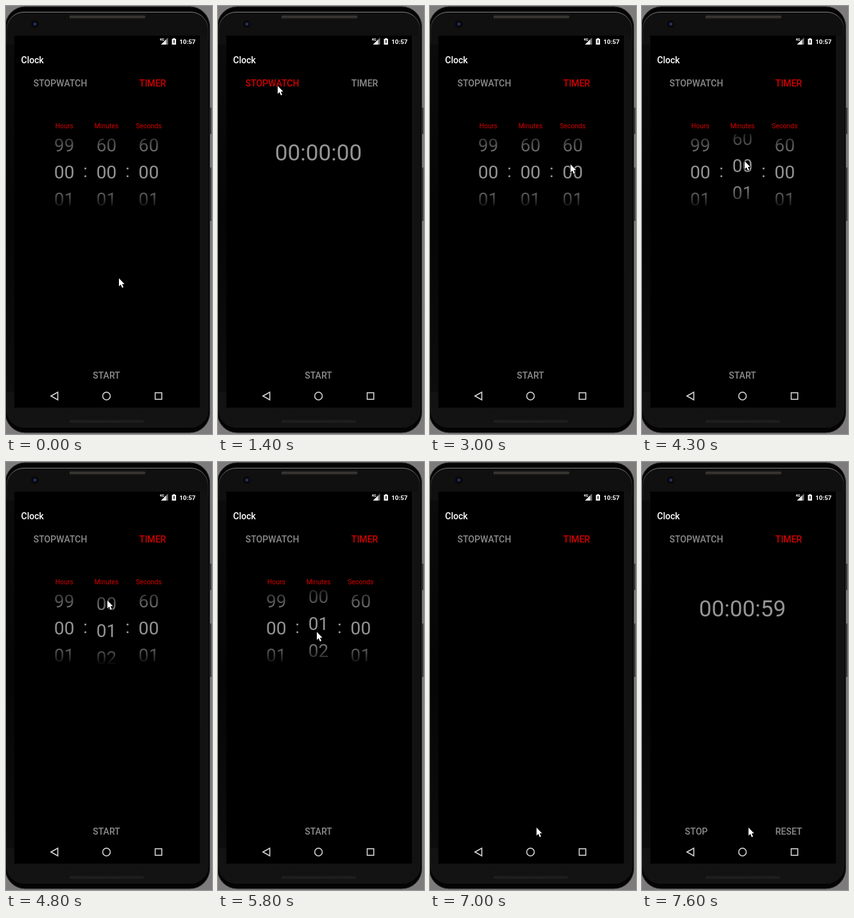
An HTML page with a canvas for the animation above (8000 ms loop, 321x665 px).

```html
<!DOCTYPE html>
<html lang="en">
<head>
<meta charset="utf-8">
<title>Clock</title>
<style>
  html, body { margin: 0; width: 100%; height: 100%; overflow: hidden; background: #7d7b7b; }
  canvas { display: block; width: 321px; height: 665px; }
</style>
</head>
<body>
<canvas id="stage"></canvas>
<script>
const W = 321, H = 665, LOOP = 8000, STEP = 100;
const DP = 0.7027;            // stage pixels per device unit
const CX = 156.6, ROW = 42;   // screen centre, wheel row height
const GREY = '#8b8b8b', DIGIT = '#949494', RED = '#d40000';

const canvas = document.getElementById('stage');
const ctx = canvas.getContext('2d');
const dpr = window.devicePixelRatio || 1;
canvas.width = W * dpr;
canvas.height = H * dpr;
ctx.scale(dpr, dpr);

const linear = k => k;
const smooth = k => k * k * (3 - 2 * k);
const easeOut = k => k * (2 - k);
const progress = (t, from, to, ease = smooth) =>
  ease(Math.min(1, Math.max(0, (t - from) / (to - from))));

// The pointer glides from place to place, on a curve if "via" is given.
function pointerAt(t) {
  let pos = [176, 423];
  const glide = (from, to, end, ease, via) => {
    const k = progress(t, from, to, ease);
    pos = pos.map((a, i) => {
      const b = end[i];
      if (!via) return a + (b - a) * k;
      return (1 - k) ** 2 * a + 2 * k * (1 - k) * via[i] + k * k * b;
    });
  };
  glide(400, 1200, [93, 124]);
  glide(1500, 2100, [217, 126]);
  glide(2700, 3600, [162, 274], linear, [235, 359]);
  glide(4000, 4900, [158, 214], easeOut);
  glide(5100, 5400, [153, 222]);
  glide(5600, 6500, [162, 555]);
  glide(6500, 6800, [166, 568], easeOut);
  return pos.map(Math.round);
}

// Two drags, then the wheel snaps back to a whole row.
function scrollAt(t) {
  const drag = 39 * progress(t, 4000, 4900) + 10 * progress(t, 5100, 5400);
  return drag + (ROW - 49) * progress(t, 5800, 6100);
}

function text(str, x, y, dp, color, align = 'center', weight = 400) {
  ctx.font = `${weight} ${dp * DP}px Roboto, sans-serif`;
  ctx.textAlign = align;
  ctx.fillStyle = color;
  ctx.fillText(str, x, y);
}

function rect(x, y, w, h, color) {
  ctx.fillStyle = color;
  ctx.fillRect(x, y, w, h);
}

function rounded(x, y, w, h, r, fill, stroke) {
  ctx.beginPath();
  ctx.roundRect(x, y, w, h, r);
  ctx.fillStyle = fill;
  ctx.fill();
  if (!stroke) return;
  ctx.lineWidth = 1;
  ctx.strokeStyle = stroke;
  ctx.stroke();
}

function disc(x, y, r, color) {
  ctx.beginPath();
  ctx.arc(x, y, r, 0, Math.PI * 2);
  ctx.fillStyle = color;
  ctx.fill();
}

function poly(points, fill) {
  ctx.beginPath();
  points.forEach(p => ctx.lineTo(...p));
  ctx.closePath();
  if (!fill) return;
  ctx.fillStyle = fill;
  ctx.fill();
}

function fade(x0, y0, x1, y1, ...colors) {
  const g = ctx.createLinearGradient(x0, y0, x1, y1);
  colors.forEach((c, i) => g.addColorStop(i / (colors.length - 1), c));
  return g;
}

function drawPhone() {
  rect(0, 0, W, H, '#7d7b7b');
  rect(318, 158, 2, 41, '#383838');
  rect(318, 251, 2, 83, '#383838');
  rounded(-1, 1, 318.5, 662, 31, '#040404', '#303030');
  rounded(1, 9.5, 314, 645, 27,
    fade(0, 9, 0, 655, '#101010', '#0e0e0e', '#131313'),
    fade(0, 9, 0, 60, '#858585', '#252525', '#171717'));
  rect(0, 60, 13, 540, fade(0, 60, 0, 600, '#0b0b0b', '#050505', '#0d0d0d'));
  rect(302, 46, 12, 578, '#121212');

  rounded(99, 14, 118, 6, 2, fade(0, 14, 0, 20, '#1a1a1a', '#413d39', '#141414'));
  disc(45, 28, 6, '#08080a');
  disc(45, 28, 3, '#131a38');
  disc(45, 28, 1.5, '#33427c');
  rect(99, 643, 116, 5, '#191919');
  for (let x = 100; x < 214; x += 3) {
    rect(x, 644, 1, 1, '#333');
    rect(x + 1, 646, 1, 1, '#333');
  }
  rect(13, 46, 289, 578, '#000');
}

function drawSignal(x, y) {
  const corner = (size, right, color) =>
    poly([[right - size, y], [right, y], [right, y - size]], color);
  corner(11, x + 11, '#777');
  corner(8, x + 8, '#e8e8e8');
}

function drawSystemBars() {
  text('4G', 243, 53.5, 8, '#fff', 'center', 700);
  drawSignal(241.5, 60);
  rect(258.5, 51, 6.5, 9, '#eee');
  rect(260.3, 50, 3, 1, '#eee');
  rect(261, 53, 1.6, 4.5, '#222');
  text('10:57', 295.5, 59, 14, '#fff', 'right', 700);

  ctx.strokeStyle = '#dedede';
  ctx.lineWidth = 1.5;
  poly([[70, 606], [80.7, 600], [80.7, 612]]);
  ctx.stroke();
  ctx.beginPath();
  ctx.arc(CX, 606, 5.9, 0, Math.PI * 2);
  ctx.stroke();
  ctx.strokeRect(232.5, 600.9, 10.2, 10.2);
}

function drawWheel(x, last, scroll) {
  ctx.save();
  ctx.beginPath();
  ctx.rect(x - 16, 199, 32, 116);
  ctx.clip();
  for (let i = 0; i < 5; i++) {
    const n = i ? '0' + (i - 1) : last;
    text(n, x, 226 + i * ROW - scroll, 40, DIGIT);
  }
  rect(x - 16, 186, 32, 54, fade(0, 186, 0, 240, '#000', '#0000'));
  rect(x - 16, 276, 32, 40, fade(0, 276, 0, 316, '#0000', '#000'));
  ctx.restore();
}

function drawPicker(scroll) {
  ['Hours', 'Minutes', 'Seconds'].forEach((name, i) => {
    const x = CX + (i - 1) * 65.8;
    text(name, x, 189.5, 15, RED);
    drawWheel(x, i ? 60 : 99, i === 1 ? scroll : 0);
    if (i) text(':', x - 33, 266, 40, DIGIT);
  });
}

function drawPointer(x, y) {
  ctx.save();
  ctx.translate(x, y);
  poly([[0, 0], [0, 12.5], [2.9, 9.8], [4.9, 14.8], [7, 13.9], [5, 9.1], [8.6, 9.1]]);
  ctx.lineJoin = 'round';
  ctx.lineWidth = 1.6;
  ctx.strokeStyle = '#000';
  ctx.stroke();
  ctx.fillStyle = '#fff';
  ctx.fill();
  ctx.restore();
}

function draw(t) {
  const stopwatch = t >= 1400 && t < 2400;
  const pressed = t >= 7000, running = t >= 7400;
  const label = (s, x, y, color = GREY) => text(s, x, y, 20, color, 'center', 500);
  const readout = s => text(s, CX, 240, 50, DIGIT);

  drawPhone();
  drawSystemBars();
  text('Clock', 23.5, 89, 20, '#fff', 'left', 500);
  label('STOPWATCH', CX - 72, 125, stopwatch ? RED : GREY);
  label('TIMER', CX + 72, 125, stopwatch ? GREY : RED);

  if (stopwatch) readout('00:00:00');
  else if (!pressed) drawPicker(scrollAt(t));

  if (!pressed) label('START', CX, 579);
  if (running) {
    readout(t < 7500 ? '00:01:00' : '00:00:59');
    label('STOP', CX - 72, 579);
    label('RESET', CX + 72, 579);
  }
  drawPointer(...pointerAt(t));
}

const start = performance.now();
function tick() {
  const t = (performance.now() - start) % LOOP;
  draw(Math.floor(t / STEP) * STEP);
  requestAnimationFrame(tick);
}
tick();
</script>
</body>
</html>
```
